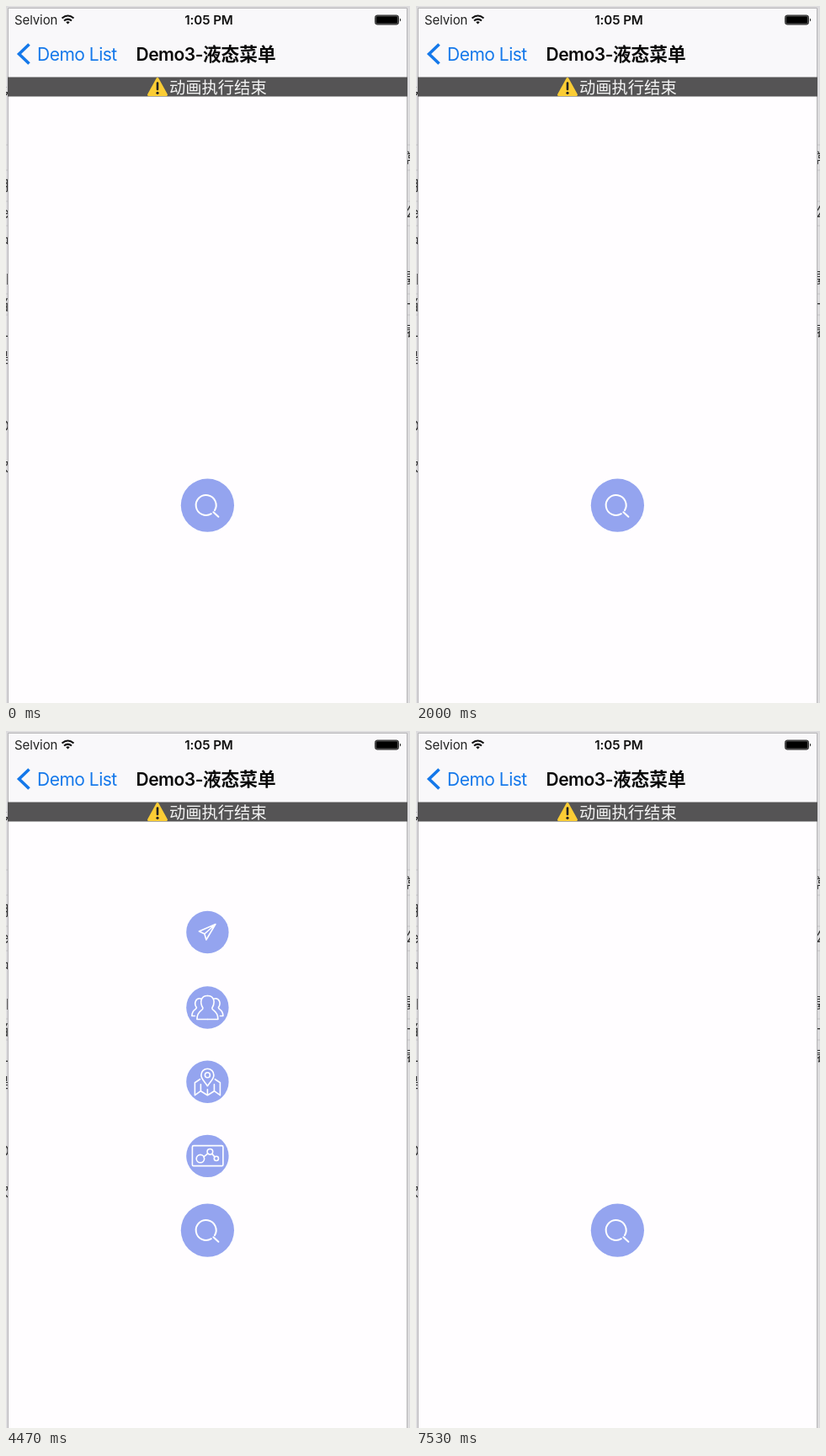
An HTML page for the animation above (7590 ms loop, 480 by 828 pixels).

```html
<!DOCTYPE html>
<html lang="zh">
<head>
<meta charset="utf-8">
<title>Demo3-液态菜单</title>
<style>
html, body { margin: 0; width: 100%; height: 100%; overflow: hidden; background: #dcdbdd; }
svg { display: block; width: 480px; height: 828px; }
text { font-family: Inter, "Noto Sans CJK SC", "Noto Sans CJK", sans-serif; }
.cjk { font-family: "Noto Sans CJK SC", "Noto Sans CJK", sans-serif; letter-spacing: 0; }
.disc, #bridges { fill: #94a4ef; }
.line { fill: none; stroke: #fff; stroke-width: 1.6; stroke-linecap: round; stroke-linejoin: round; }
.bold { stroke-width: 2; }
</style>
</head>
<body>
<svg viewBox="0 0 480 828">
  <!-- window behind, seen only at the edges -->
  <rect width="480" height="828" fill="#dcdbdd"/>
  <path d="M0 165H480M0 195H480M0 232H480M0 261H480M0 342H480M0 367H480" stroke="#c4c3c5"/>
  <g class="cjk" font-size="17" fill="#333">
    <g text-anchor="end">
      <text x="4" y="109">多</text><text x="4" y="219">用</text><text x="4" y="252">e</text>
      <text x="4" y="286">中</text><text x="4" y="331">l</text><text x="4" y="361">当</text>
      <text x="4" y="399">一</text><text x="4" y="424">是</text><text x="4" y="505">D</text><text x="4" y="553">次</text>
    </g>
    <text x="474" y="187">常</text><text x="474" y="251">公</text><text x="474" y="329">要</text>
    <text x="474" y="359">-</text><text x="474" y="392">表</text>
  </g>

  <!-- phone screen -->
  <path d="M2.5 828V2.5H476.5V828" fill="#fffdff" stroke="#b4b3b6"/>
  <rect x="3" y="3" width="473" height="82" fill="#f9f8fa"/>
  <text x="10" y="22" font-size="15" letter-spacing="-.1" fill="#222">Selvion</text>
  <g fill="none" stroke="#111" stroke-width="2">
    <path d="M66.5 14.5Q73.5 8.5 80.5 14.5M69 17.5Q73.5 13.7 78 17.5"/>
    <path d="M71.3 19.2Q73.5 17.4 75.7 19.2L73.5 21.4z" fill="#111" stroke="none"/>
  </g>
  <text x="241" y="22" font-size="15.2" font-weight="600" text-anchor="middle" letter-spacing="-.1" fill="#111">1:05 PM</text>
  <rect x="438.5" y="11" width="28" height="11" rx="2.5" fill="#555" stroke="#333"/>
  <rect x="440" y="12.5" width="25" height="8" rx="1"/>
  <path d="M468 14.5q2 2 0 4z"/>
  <path d="M27.5 45.5L15.5 57L27.5 68.5" fill="none" stroke="#1478ea" stroke-width="3.6"/>
  <text x="37" y="64.5" font-size="21" letter-spacing="-.5" fill="#1478ea">Demo List</text>
  <text x="154.5" y="64.5" font-size="21" font-weight="600" letter-spacing="-.5" fill="#0a0a0a">Demo3-<tspan class="cjk" font-size="21.7" font-weight="700">液态菜单</tspan></text>
  <rect x="2" y="84.5" width="475" height="23" fill="#555455"/>
  <path d="M180 86.5L190.5 105.5H169.5z" fill="#fbcd35" stroke="#fbcd35" stroke-width="3" stroke-linejoin="round"/>
  <path d="M180 91.5V99" stroke="#222" stroke-width="2.6" stroke-linecap="round"/>
  <circle cx="180" cy="103.3" r="1.6" fill="#222"/>
  <text class="cjk" x="194" y="104" font-size="19.3" fill="#f4f4f4">动画执行结束</text>

  <!-- menu, farthest item first -->
  <path id="bridges"/>
  <g class="item">
    <circle class="disc" r="25.2"/>
    <path class="line" d="M9.5-9.5L-10-1-3.5 2-1.5 9zL-3.5 2"/>
  </g>
  <g class="item">
    <circle class="disc" r="25.2"/>
    <g class="line">
      <path id="half" d="M0-14C8-14 9.5-6 5.5 .5C5 4 12.5 3 12.5 14H0M8-10.500C14-12 16.500-5 13 0C13 3 18.500 2 18.500 10H15"/>
      <use href="#half" transform="scale(-1 1)"/>
    </g>
  </g>
  <g class="item">
    <circle class="disc" r="25.2"/>
    <g class="line">
      <path d="M0 5C-3 0-7.5-3-7.5-8A7.5 7.5 0 0 1 7.5-8C7.5-3 3 0 0 5z"/>
      <circle cy="-8" r="3"/>
      <path d="M-9-3L-15 1V16L-8 11L0 16L8 11L15 16V1L9-3M-8 3V11M0 9V16M8 3V11"/>
    </g>
  </g>
  <g class="item">
    <circle class="disc" r="25.2"/>
    <g class="line">
      <rect x="-18" y="-12.2" width="36.500" height="24" rx="1.5"/>
      <circle cx="-8.5" cy="3.2" r="4.7"/>
      <circle cx="3" cy="-5" r="3.3"/>
      <circle cx="10.5" cy="3" r="2.6"/>
      <path d="M-4.5 1L.5-3M5.5-2.5L8.5 1"/>
    </g>
  </g>
  <g transform="translate(239.400 593.200)">
    <circle class="disc" r="31.6"/>
    <path class="line bold" d="M4.5 10A12 12 0 1 1 8.5 6M7 8L13 13.500"/>
  </g>
</svg>
<script>
const LOOP = 7590, STEP = 1000 / 15;
const X = 239.4, HOME = 593.2, GAP = 88.4, R = 25.2, HOME_R = 31.6, SNAP = 85;
const TAPS = [[830, 1370], [3873, 5900]];   // open, close
const DELAY = 59, CLOSE = 313, OMEGA = 0.0177, ZETA = 0.7;
const items = [...document.querySelectorAll(".item")];
const bridges = document.getElementById("bridges");

function spring(ms) {
  if (ms <= 0) return 0;
  const wd = Math.sqrt(1 - ZETA * ZETA), a = OMEGA * ms;
  return 1 - Math.exp(-ZETA * a) * (Math.cos(wd * a) + ZETA / wd * Math.sin(wd * a));
}

// Share of the full distance; n = 1 is the item nearest the button.
function reach(t, n) {
  const tap = TAPS.findLast(([open]) => t >= open);
  if (!tap) return 0;
  const u = (t - tap[1] - (4 - n) * DELAY) / CLOSE;
  const left = 1 - Math.min(1, Math.max(0, u)) ** 2;
  return spring(t - tap[0] - (n - 1) * DELAY) * left;
}

// Neck between two discs, tangent to both; it snaps when they are too far apart.
function bridge(y1, r1, y2, r2) {
  const d = y2 - y1;
  if (d < r1 + r2 || d > SNAP) return "";
  const a = 0.56, k = Math.tan(a);
  const x1 = r1 * Math.cos(a), x2 = r2 * Math.cos(a);
  const top = y1 + r1 * Math.sin(a), end = y2 - r2 * Math.sin(a);
  const s = (x1 - x2 + k * (end - top)) / (2 * k), c = x1 - k * s;
  return `M${X - x1} ${top}Q${X - c} ${top + s} ${X - x2} ${end}H${X + x2}` +
         `Q${X + c} ${top + s} ${X + x1} ${top}z`;
}

function draw(now) {
  const t = Math.floor((now % LOOP + 5) / STEP) * STEP;
  const ys = items.map((_, i) => HOME - reach(t, 4 - i) * GAP * (4 - i));
  items.forEach((el, i) => el.setAttribute("transform", `translate(${X} ${ys[i]})`));
  bridges.setAttribute("d", ys.map((y, i) =>
    i < 3 ? bridge(y, R, ys[i + 1], R) : bridge(y, R, HOME, HOME_R)).join(""));
}

const start = performance.now();
function tick() {
  draw(performance.now() - start);
  requestAnimationFrame(tick);
}
tick();
</script>
</body>
</html>
```
